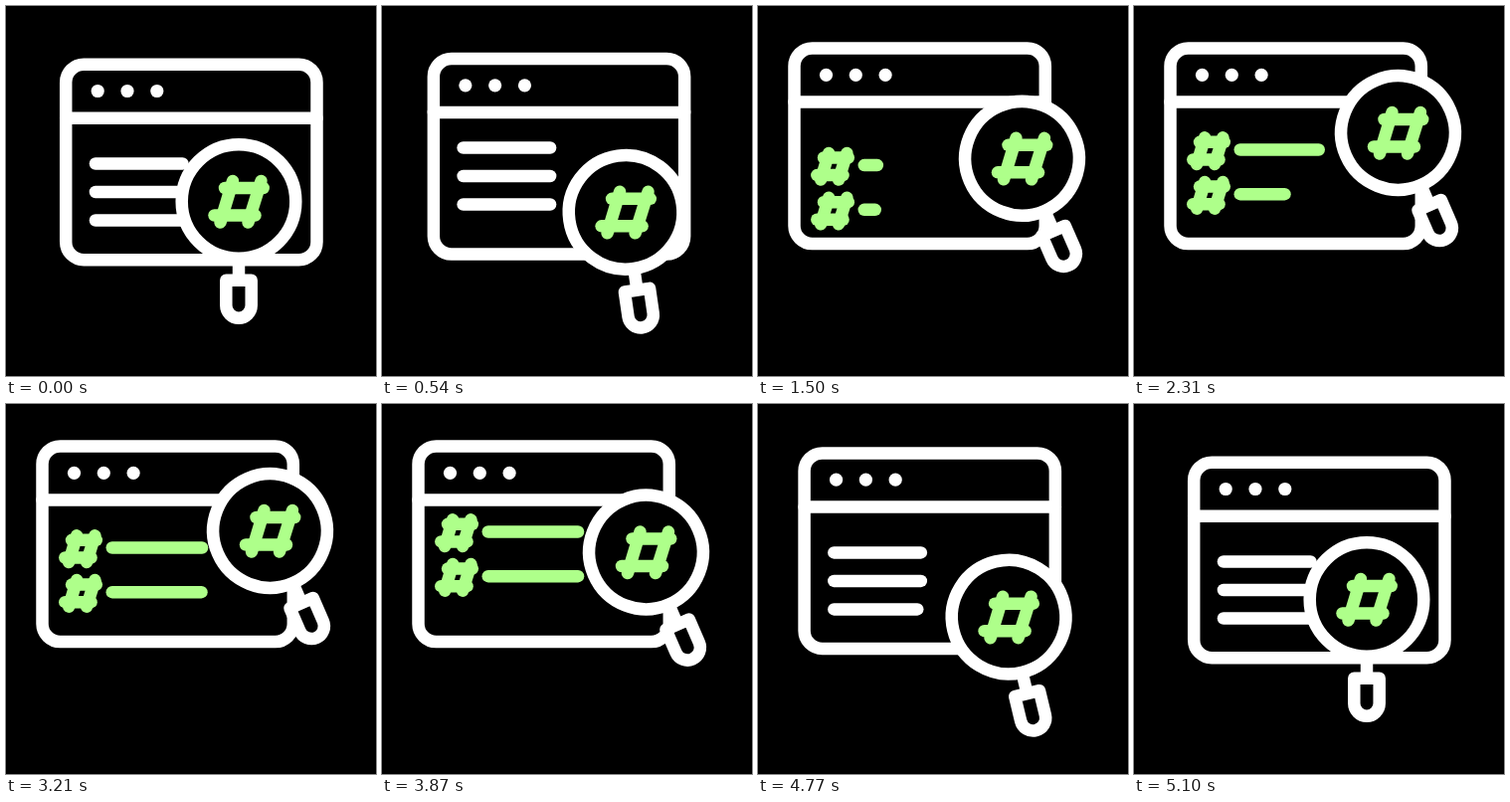
These frames come from a looping animation (372 px wide and 372 px high, 5.4 s). An HTML page with a canvas:

```html
<!DOCTYPE html>
<html lang="en">
<head>
<meta charset="utf-8">
<title>Hashtag search</title>
<style>
html, body { margin: 0; width: 100%; height: 100%; overflow: hidden; background: #000; }
canvas { display: block; width: 372px; height: 372px; }
</style>
</head>
<body>
<canvas id="stage" width="372" height="372"></canvas>
<script>
const ctx = document.getElementById('stage').getContext('2d');
const LOOP = 5400, STEP = 30, STROKE = 12.5, CAP = STROKE / 2;
const WHITE = '#fff', GREEN = '#aeff8a';
const TILT = -23.5 * Math.PI / 180;

const mix = (a, b, p) => a + (b - a) * p;

// Eased progress between two times
function ease(t, start, end) {
  const x = Math.min(1, Math.max(0, (t - start) / (end - start)));
  return x * x * (3 - 2 * x);
}

function line(x1, y1, x2, y2) {
  ctx.beginPath();
  ctx.moveTo(x1, y1);
  ctx.lineTo(x2, y2);
  ctx.stroke();
}

// Round-capped bar given by its outer ends
const bar = (left, right, y) => line(left + CAP, y, right - CAP, y);

function hash(x, y, k) {
  ctx.strokeStyle = GREEN;
  const part = (x1, y1, x2, y2) => line(x + x1 * k, y + y1 * k, x + x2 * k, y + y2 * k);
  part(-6, -20.5, -18.5, 21);
  part(22.5, -20.5, 9.5, 21);
  part(-14, -13.5, 24.7, -13.5);
  part(-24.5, 14, 16.5, 14);
}

function drawList(t) {
  const scrollIn = ease(t, 300, 1800), scrollOut = ease(t, 3600, 4800);
  const returning = t >= 3600;

  ctx.strokeStyle = WHITE;
  const shift = returning ? 124 * (1 - scrollOut) : -150 * scrollIn;
  [4500, 4740, 4900].forEach((end, i) => {
    const grown = returning ? ease(t, 3900, end) : 1;
    bar(60, mix(83, 160, grown), 142.3 + 28.5 * i + shift);
  });

  const tagY = 144.5 + 150 * (1 - scrollIn) - 124 * scrollOut;
  const growth = [ease(t, 1380, 2600), ease(t, 1500, 3300)];
  growth.forEach((p, i) => {
    const y = tagY + 44.7 * i;
    hash(75, y + 1, 0.64);
    bar(100.5, mix(124, 203.3, p), y);
  });
}

function drawWindow(t, away) {
  ctx.save();
  ctx.translate(mix(23.7, 0, away), mix(16.2, 0, away));

  ctx.save();
  ctx.beginPath();
  ctx.rect(36.5, 96.5, 252.5, 142.5);
  ctx.clip();
  drawList(t);
  ctx.restore();

  ctx.strokeStyle = ctx.fillStyle = WHITE;
  ctx.beginPath();
  ctx.roundRect(36.5, 42.5, 252.3, 196.5, 18);
  ctx.stroke();
  line(36.5, 96.5, 288.8, 96.5);
  for (let i = 0; i < 3; i++) {
    ctx.beginPath();
    ctx.arc(68.5 + 29.8 * i, 69.3, 6.6, 0, 2 * Math.PI);
    ctx.fill();
  }
  ctx.restore();
}

function drawLens(t, away) {
  const lowered = mix(196.5, 227.2, away);
  const lift = ease(t, 900, 1800) - ease(t, 3600, 4500);
  const x = mix(234, 265.5, away), y = lowered - 99.7 * lift;

  ctx.save();
  ctx.translate(x, y);
  ctx.rotate(TILT * away);
  ctx.strokeStyle = WHITE;
  ctx.fillStyle = '#000';
  line(0, 60, 0, 76);
  ctx.beginPath();
  ctx.moveTo(-12.7, 79.2);
  ctx.lineTo(12.7, 79.2);
  ctx.lineTo(12.7, 104.5);
  ctx.arc(0, 104.5, 12.7, 0, Math.PI);
  ctx.closePath();
  ctx.fill();
  ctx.stroke();
  ctx.beginPath();
  ctx.arc(0, 0, 57.3, 0, 2 * Math.PI);
  ctx.fill();
  ctx.stroke();
  ctx.restore();

  hash(x, y, 1);
}

function draw(t) {
  ctx.fillStyle = '#000';
  ctx.fillRect(0, 0, 372, 372);
  ctx.lineWidth = STROKE;
  ctx.lineCap = ctx.lineJoin = 'round';
  const away = ease(t, 300, 900) - ease(t, 4500, 5100);
  drawWindow(t, away);
  drawLens(t, away);
}

const begun = performance.now();
function tick() {
  const t = (performance.now() - begun) % LOOP;
  draw(Math.floor(t / STEP) * STEP);
  requestAnimationFrame(tick);
}
tick();
</script>
</body>
</html>
```
